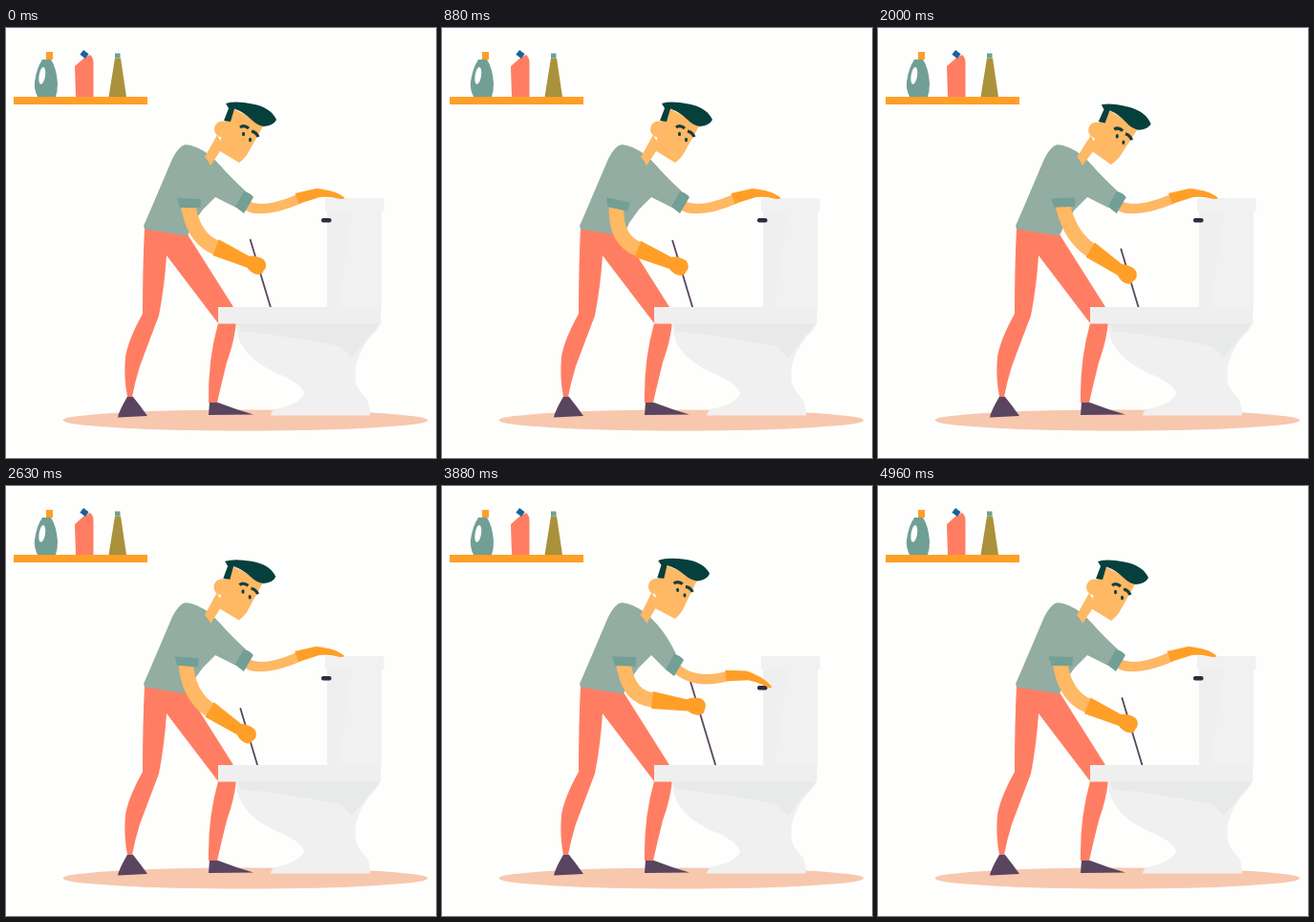
Recreate the animation shown at these times as an HTML page. Size 450 by 450 pixels, loop 5 s.

```html
<!DOCTYPE html>
<html lang="en">
<head>
<meta charset="utf-8">
<title>Cleaning the bathroom</title>
<style>
html, body { margin: 0; width: 100%; height: 100%; overflow: hidden; background: #fefefd; }
svg { display: block; width: 100%; height: 100%; }
.shirt { fill: #93ada2; }
.cuff { fill: #729f96; }
.skin { fill: #ffb864; }
.arm { fill: none; stroke: #ffb864; stroke-linejoin: round; }
.glove { fill: #ff9f27; }
.pants { fill: #ff7e63; }
.shoe { fill: #5a4560; }
.hair { fill: #06403d; }
</style>
</head>
<body>
<svg viewBox="0 0 450 450">
  <g id="shelf">
    <path fill="#ff9f27" d="M8 72H148V80H8Z"/>
    <path fill="#719f95" d="M38 33H47Q53 42 54 58Q54 66 52 72H33Q29 64 30 56Q32 42 38 33Z"/>
    <rect class="glove" x="42" y="25" width="7" height="8"/>
    <ellipse cx="37.800" cy="50" rx="3.200" ry="9" fill="#fefefd" transform="rotate(9 38 50)"/>
    <path fill="#ff7e63" d="M72 40L81 32L88 28Q92 31 91.500 38V72H73Z"/>
    <rect x="78.500" y="24.500" width="7" height="6" fill="#17639c" transform="rotate(38 82 27.500)"/>
    <path fill="#aa913b" d="M114 31.500H120L126 72H107.500Z"/>
    <rect class="cuff" x="114" y="26.500" width="5.500" height="5"/>
  </g>

  <ellipse cx="250.500" cy="410.500" rx="191" ry="11" fill="#f7c8ae"/>

  <g id="legs">
    <path class="shoe" d="M128 384L133 386Q141 396 148 406L117 407.500Q118 401 128 384Z"/>
    <path class="shoe" d="M213 391L222 392Q240 399 259 404.500L212 405Z"/>
    <path class="pants" d="M145 209L190 216L238 292L241 308Q239 328 231 350Q227 366 221 392H212Q211 348 222 309L168 238Q166 270 160 301Q152 322 140 354Q135 370 132 386H127Q123 366 125 344Q128 326 143 299Q143 250 145 209Z"/>
  </g>

  <path class="shirt" d="M188 122Q200 123 213 133L226 146L232 165L219 177L206 190L196 204L190 217.500Q167 214 145 210.500L144 207L148 198L174 137Q181 123 188 122Z"/>
  <path class="shirt" id="sleeveR"/>

  <g id="head">
    <path class="skin" d="M221 112L230 128L224 129L214 144Q212 139 208 135Z"/>
    <circle class="skin" cx="226.500" cy="106" r="8.500"/>
    <path class="skin" d="M237 84L270 101L252 133Q248 138 244 141L222 127.500L230 97Z"/>
    <path class="hair" d="M230 79Q240 76 258 79.500Q277 83 283 96Q280 102 270 103Q263 102 257 96Q249 88 239 84.500L235 98L228 97L233 84Z"/>
    <path fill="none" stroke="#173d3b" stroke-width="3.200" d="M245 104Q249 101 254 105M257 108Q262 109 264 114"/>
    <ellipse class="hair" cx="248.500" cy="111" rx="1.500" ry="2.200"/>
    <ellipse class="hair" cx="255.500" cy="117" rx="1.500" ry="2.200"/>
  </g>

  <line id="stick" stroke="#5a4560" stroke-width="1.800"/>

  <g id="toilet">
    <path fill="#f0f1f0" d="M336 190H393V294H336Z"/>
    <path fill="#eeefee" d="M336 191H362L348 293H336Z"/>
    <rect x="334" y="178" width="61.500" height="14" rx="1.500" fill="#f1f1f1"/>
    <path fill="#eff0ef" d="M240 308H392Q391 313 386 318Q362 344 366 371Q368 379 377 388Q381 394 381 405.500H277Q278 399 285 398Q306 394 312 383Q311 374 290 364C262 352 243 338 241 312Z"/>
    <path fill="#e8eae9" d="M242 309H391Q388 316 380 322L362 345L350 333Q300 323 245 317Z"/>
    <path fill="#efefef" d="M222 292H392.500V309.500H222Z"/>
    <rect id="lever" x="330" y="199" width="10.500" height="4.500" rx="2" fill="#34293f"/>
  </g>

  <path class="arm" id="armR" stroke-width="10.500"/>
  <path class="cuff" id="cuffR" d="M249 171Q255 172 259 177L249 194L240 187Z"/>
  <path class="glove" id="gloveR" d="M-2 -5L20 -10Q42 -8 50 0Q48 2 41 0Q32 -2 24 -1L2 6Z"/>

  <path class="shirt" id="sleeveL" d="M-7 0H9L14 42L-10 36Z"/>
  <path class="arm" id="armL" stroke-width="15.500"/>
  <path class="cuff" id="cuffL" d="M-10 35L14.500 41L12 50L-9 45Z"/>
  <path class="glove" id="gloveL" d="M-48 -9L-12 -6Q-7 -9 -2 -9Q4 -10 7 -6Q10 -2 8 2Q9 6 4 8Q-2 10 -9 6L-47 9Z"/>
</svg>
<script>
const LOOP = 5000, TURN = 780;
const SHOULDER = { x: 181, y: 142 }, UPPER = 80, FORE = 71;
const REST = { x: 263, y: 249 }, RAISED = { x: 267, y: 231 };

const el = id => document.getElementById(id);
const set = (id, attrs) => { for (const k in attrs) el(id).setAttribute(k, attrs[k]); };
const place = (id, x, y, deg = 0) => set(id, { transform: `translate(${x} ${y}) rotate(${deg})` });
const mix = (a, b, k) => a + (b - a) * k;
const blend = (p, q, k) => ({ x: mix(p.x, q.x, k), y: mix(p.y, q.y, k) });
const pt = p => `${p.x} ${p.y}`;
const degrees = (a, b) => Math.atan2(b.y - a.y, b.x - a.x) * 180 / Math.PI;

function ramp(t, from, to) {
  const u = Math.min(1, Math.max(0, (t - from) / (to - from)));
  return u * u * (3 - 2 * u);
}
// Rises from a to b, holds, falls from c to d
const pulse = (t, a, b, c, d) => ramp(t, a, b) - ramp(t, c, d);

const nodAt = t => 1.8 * pulse(t, 0, 420, 420, 880)
  + 3.6 * pulse(t, 950, 1400, 2050, 2550)
  - 3.6 * pulse(t, 2350, 3200, 3850, 4950);

// The fist circles anticlockwise, rises while flushing and rests at the loop's ends
function fistAt(t) {
  const a = 3.54 - 2 * Math.PI * (t - 880) / TURN;
  const orbit = { x: 256 + 8 * Math.cos(a), y: 253 + 8 * Math.sin(a) };
  const scrub = blend(REST, orbit, pulse(t, 450, 850, 4600, 5000));
  return blend(scrub, RAISED, pulse(t, 3290, 3700, 3900, 4350));
}

function elbowFor(hand) {
  const dx = hand.x - SHOULDER.x, dy = hand.y - SHOULDER.y;
  const d = Math.min(Math.hypot(dx, dy), UPPER + FORE);
  const along = (UPPER ** 2 - FORE ** 2 + d * d) / (2 * d);
  const out = Math.sqrt(Math.max(0, UPPER ** 2 - along ** 2));
  return {
    x: SHOULDER.x + (dx * along - dy * out) / d,
    y: SHOULDER.y + (dy * along + dx * out) / d
  };
}

function drawScrubArm(t) {
  const hand = fistAt(t), elbow = elbowFor(hand);
  const lean = degrees(SHOULDER, elbow) - 90;
  place('sleeveL', SHOULDER.x, SHOULDER.y, lean);
  place('cuffL', SHOULDER.x, SHOULDER.y, lean);
  const upper = k => pt(blend(SHOULDER, elbow, k)), fore = k => pt(blend(elbow, hand, k));
  set('armL', { d: `M${upper(0.5)}L${upper(0.65)}Q${pt(elbow)} ${fore(0.33)}L${fore(0.4)}` });
  place('gloveL', hand.x, hand.y, degrees(elbow, hand));
  const x = hand.x - 7.5, top = hand.y - 28, end = 300;
  set('stick', { x1: x, y1: top, x2: x + (end - top) * 0.3, y2: end });
}

function drawRestArm(t, nod) {
  const reach = pulse(t, 2700, 3250, 3900, 4350);
  const press = pulse(t, 3250, 3600, 3900, 4080);
  const p = reach * (0.85 + 0.15 * press);
  const sway = nod * 0.4 * (1 - reach), lift = 10 * p * (p - press);
  const cx = -6 * p, cy = 5 * p;
  const wx = mix(304.5, 297, p) + sway, wy = mix(178, 198, p) - lift;
  place('cuffR', cx + sway / 2, cy);
  set('sleeveR', { d: `M213 132L226 146Q236 157 ${251 + cx} ${171 + cy}L${241 + cx} ${188 + cy}L219 177Z` });
  set('armR', { d: `M${248 + cx} ${183 + cy}Q${mix(264, 262, p)} ${mix(197, 209, p) - lift / 2} ${wx + 2} ${wy + 1}` });
  place('gloveR', wx, wy, 15 * p);
  place('lever', 0, 10 * press);
}

function draw(t) {
  const nod = nodAt(t);
  set('head', { transform: `rotate(${nod} 213 140)` });
  drawScrubArm(t);
  drawRestArm(t, nod);
}

const start = performance.now();
function tick() {
  draw((performance.now() - start) % LOOP);
  requestAnimationFrame(tick);
}
tick();
</script>
</body>
</html>
```
